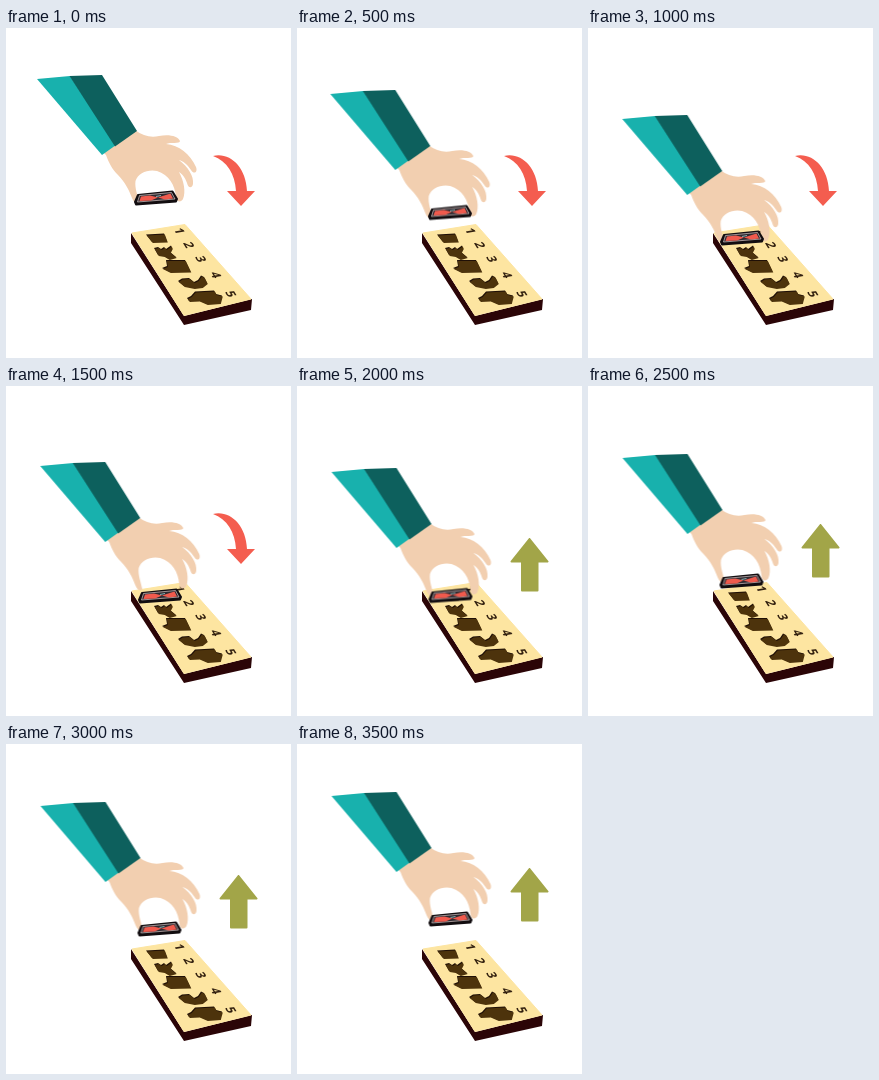
Write an HTML page that moves like this. It is 285 by 330 pixels and loops after 4000 ms.

```html
<!DOCTYPE html>
<html lang="en">
<head>
<meta charset="utf-8">
<title>Shape puzzle</title>
<style>
  html, body { margin: 0; width: 100%; height: 100%; overflow: hidden; background: #fff; }
  svg { display: block; width: 285px; height: 330px; }
  .digits text { font: 700 12.5px "Open Sans", "Noto Sans", sans-serif; text-anchor: middle; fill: #32200f; }
  .hand, .piece, .down, .up { animation: 4s step-end infinite; }
  .hand { animation-name: hand; }
  .piece { animation-name: piece; }
  .down { animation-name: down; }
  .up { animation-name: up; }

  @keyframes hand {
    0% { transform: translate(0, 0); }
    12.5% { transform: translate(2.3px, 15px); }
    25% { transform: translate(3.2px, 40px); }
    37.5% { transform: translate(3.2px, 29px); }
    50% { transform: translate(3.5px, 35px); }
    62.5% { transform: translate(3.5px, 21px); }
    75% { transform: translate(3.5px, 11px); }
    87.5%, 100% { transform: translate(3.5px, 1px); }
  }
  @keyframes piece {
    0% { transform: translate(150px, 170px); }
    12.5% { transform: translate(153px, 184.5px); }
    25%, 37.5% { transform: translate(154px, 210px); }
    50% { transform: translate(153.5px, 209.5px); }
    62.5% { transform: translate(153.5px, 195px); }
    75% { transform: translate(153.5px, 185px); }
    87.5%, 100% { transform: translate(153.5px, 175px); }
  }
  @keyframes down {
    0% { opacity: 1; }
    50%, 100% { opacity: 0; }
  }
  @keyframes up {
    0% { opacity: 0; transform: translate(0, 28px); }
    50% { opacity: 1; transform: translate(0, 28px); }
    62.5% { opacity: 1; transform: translate(0, 14px); }
    75% { opacity: 1; transform: translate(0, 7px); }
    87.5%, 100% { opacity: 1; transform: translate(0, 0); }
  }
</style>
</head>
<body>
<svg viewBox="0 0 285 330">
  <defs>
    <g id="holes">
      <path d="M140 206.500 158 205.500 161 213.500 146 214Z"/>
      <path d="M148 220 152 219 155 221 158 219 160 221 165 217.500 166 220 164 224 170 229 163 231 158 228 152 227Z"/>
      <path d="M160 232 179 232 184.500 243.500 164 244 156 240 161 238Z"/>
      <path d="M172 253 176 250.500 183 250 188 254 192 252 195 247.500 198 249 201 255 196 259 188 260 178 258Z"/>
      <path d="M181 270 185 268 189 263.500 208 262.500 210 266 216 267.500 214 275 201 276 193 272.500 183 273Z"/>
    </g>
  </defs>

  <g class="board">
    <path fill="#2b0507" d="M125 205 178 288 246 271 245 282 178 297 125 215Z"/>
    <path fill="#fde5a1" stroke="#fde5a1" stroke-linejoin="round" d="M126 205 179 196.500 245 271 178 287.500Z"/>
    <use href="#holes" fill="#1f0f06"/>
    <use href="#holes" fill="#4d330c" transform="translate(.8 1)"/>
    <g class="digits">
      <text y="4.500" transform="matrix(.5 .82 -.98 .17 173.500 203)">1</text>
      <text y="4.500" transform="matrix(.5 .82 -.98 .17 183 217)">2</text>
      <text y="4.500" transform="matrix(.5 .82 -.98 .17 195 231)">3</text>
      <text y="4.500" transform="matrix(.5 .82 -.98 .17 210 247)">4</text>
      <text y="4.500" transform="matrix(.5 .82 -.98 .17 225 266)">5</text>
    </g>
  </g>

  <path class="down" fill="#f45d4f" d="M207 128C224 124 240 139 241 163L249 163 235 178 221 163 230 163C229 146 221 133 207 128Z"/>
  <path class="up" fill="#a2a548" stroke="#a2a548" stroke-width="2" stroke-linejoin="round" d="M232.500 125 250.500 147.500 240.500 147.500 240.500 176.500 225 176.500 225 147.500 214.500 147.500Z"/>

  <g class="hand">
    <path fill="#f2cfb0" d="M97 124 129 102C137 108 145 110 153 108C163 106 172 108 174 113C174 116 164 114 160 116C173 117 184 126 190 139C192 144 188 147 185 142C181 136 177 133 173 132C182 139 188 148 187 156C186 161 182 160 181 155C179 149 176 146 173 144C178 153 180 164 177 171C175 175 170 174 170 169C169 157 163 147 151 143C142 141 132 145 129.500 153C128.500 160 132 168 133 174C131 177 128 175 126 170C123 162 119 154 112 147C106 141 103 135 100 127Z"/>
    <path fill="#18b1ad" d="M31 51 64 48 110 117 96 127Z"/>
    <path fill="#0d605d" d="M63.500 48 96 47 131 103 109 118.500Z"/>
  </g>

  <g class="piece">
    <path fill="#120d10" stroke="#120d10" stroke-width="2" stroke-linejoin="round" d="M-18-3 16.500-6.500 21 1 20 3.500-20 6.500-21 4Z"/>
    <path fill="#302b31" stroke="#d9c9c8" stroke-width=".7" stroke-linejoin="round" d="M-16.500-2.500 15.500-5.500 19 1-18.500 4Z"/>
    <path fill="#f05a4d" d="M-15-1.500-6-2.500 2-.5-5 2.500-16.500 3ZM2-.5 14.500-4.500 17 .5 9 1.500Z"/>
    <path fill="none" stroke="#87aeb2" d="M0-1.500 5-2.500"/>
  </g>
</svg>
</body>
</html>
```
